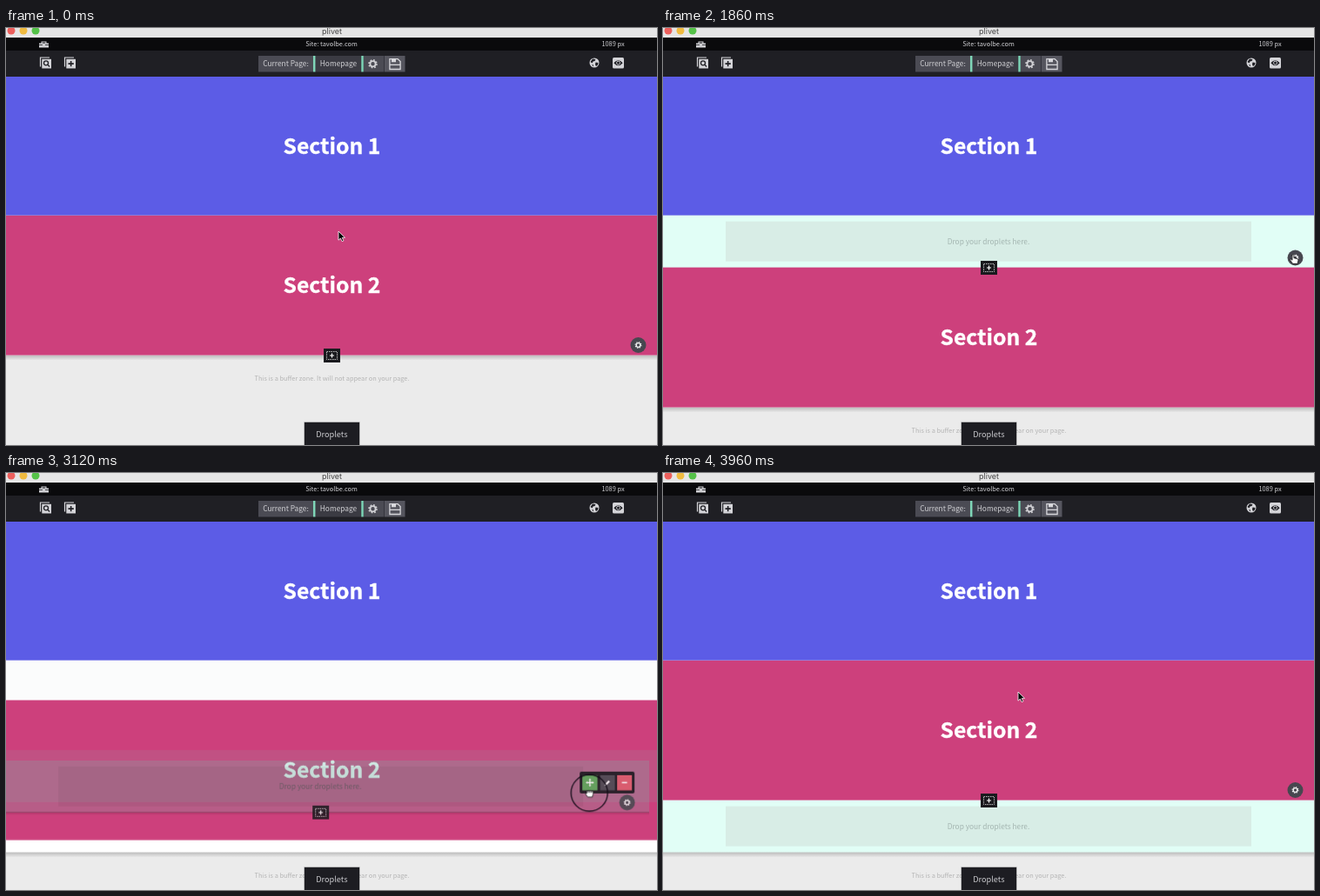
Animation, 748 px wide and 480 px high, one loop 3990 ms. Source, as an HTML page:

```html
<!DOCTYPE html>
<html lang="en">
<head>
<meta charset="utf-8">
<title>Page builder</title>
<style>
html, body { margin: 0; width: 100%; height: 100%; overflow: hidden; background: #fff; }
svg { display: block; width: 748px; height: 480px; }
text { font: 7.4px "Noto Sans CJK JP", "Noto Sans CJK SC", "Noto Sans CJK", "Noto Sans", sans-serif; text-anchor: middle; }
.head { font-size: 24.7px; font-weight: 700; fill: #fff; stroke: #fff; stroke-width: .35px; }
.mid { font-size: 8.35px; }
.big { font-size: 9.2px; }
.win { font: 9px Inter, Roboto, sans-serif; fill: #444; }

/* every moving part shares one clock */
.a { animation: 3990ms linear infinite both; }

/* layout */
.below { animation-name: below; }
.sec2 { animation-name: sec2; }
.home { animation-name: home; }
.gap { animation-name: gap; }
.drop { animation-name: drop; }
@keyframes below {
  0%, 28.6% { transform: translateY(0); animation-timing-function: ease-in-out; }
  35%, 100% { transform: translateY(60px); }
}
@keyframes sec2 {
  0%, 28.6% { transform: translateY(0); animation-timing-function: ease-in-out; }
  35%, 76.3% { transform: translateY(60px); animation-timing-function: ease-in-out; }
  82%, 100% { transform: translateY(0); }
}
@keyframes home { 0%, 67.7% { opacity: 1; } 75%, 100% { opacity: 0; } }
@keyframes gap { 0%, 75% { opacity: 1; } 79%, 100% { opacity: 0; } }
@keyframes drop { 0%, 82.5% { opacity: 0; } 87%, 100% { opacity: 1; } }

/* dragged section */
.drag { animation-name: drag; }
.sheet { animation-name: sheet; }
.trail { animation-name: trail; }
.late { animation-delay: 30ms; }
@keyframes drag {
  0%, 67.7% { transform: translate(0, 0); animation-timing-function: cubic-bezier(.4, 0, .8, .7); }
  74.44% { transform: translate(-6.4px, 55px); }
  80.45% { transform: translate(-16.6px, 150px); animation-timing-function: ease-out; }
  82.5% { transform: translate(-17px, 160px); animation-timing-function: ease-in-out; }
  86%, 100% { transform: translate(0, 161px); }
}
@keyframes sheet { 0%, 67.7% { opacity: 0; } 69%, 82.5% { opacity: 1; } 87%, 100% { opacity: 0; } }
@keyframes trail { 0%, 76% { opacity: 0; } 78%, 81.5% { opacity: .6; } 83%, 100% { opacity: 0; } }

/* hover controls */
.ctl1 { animation-name: ctl1; }
.ctl2 { animation-name: ctl2; }
.ctlNew { animation-name: ctlNew; }
.menu { animation-name: menu; }
.tip1 { animation-name: tip1; }
.tip2 { animation-name: tip2; }
@keyframes ctl1 { 0%, 10% { opacity: 0; } 12.5%, 31% { opacity: 1; } 34%, 100% { opacity: 0; } }
@keyframes ctl2 { 0%, 10% { opacity: 1; } 12.5%, 89% { opacity: 0; } 91.5%, 100% { opacity: 1; } }
@keyframes ctlNew {
  0%, 34% { opacity: 0; } 36.5%, 67.7% { opacity: 1; }
  70%, 82.5% { opacity: .86; } 89% { opacity: 1; } 92%, 100% { opacity: 0; }
}
@keyframes menu {
  0%, 50% { opacity: 0; transform: translateX(12px); animation-timing-function: ease-out; }
  54%, 84% { opacity: 1; transform: none; } 88%, 100% { opacity: 0; transform: none; }
}
@keyframes tip1 { 0%, 15% { opacity: 0; } 18%, 28% { opacity: 1; } 31%, 100% { opacity: 0; } }
@keyframes tip2 { 0%, 60% { opacity: 0; } 63.2%, 65% { opacity: 1; } 67.5%, 100% { opacity: 0; } }

/* pointer */
.mouse { animation-name: mouse; }
.arrow { animation-name: arrow; animation-timing-function: step-end; }
.point { animation-name: point; animation-timing-function: step-end; }
.grab { animation-name: grab; animation-timing-function: step-end; }
.ring { animation-name: ring; }
@keyframes mouse {
  0% { transform: translate(382px, 234px); animation-timing-function: ease-in-out; }
  12.5%, 29.5% { transform: translate(374px, 214px); animation-timing-function: ease-in-out; }
  45%, 50% { transform: translate(723px, 261px); animation-timing-function: ease-in-out; }
  58%, 63% { transform: translate(684px, 244px); }
  67.7% { transform: translate(683px, 251px); animation-timing-function: cubic-bezier(.4, 0, .8, .7); }
  74.44% { transform: translate(677.5px, 306px); }
  80.45% { transform: translate(666px, 405px); animation-timing-function: ease-out; }
  82.5%, 84% { transform: translate(665px, 414px); animation-timing-function: ease-in-out; }
  97%, 100% { transform: translate(408px, 252px); }
}
@keyframes arrow { 0% { opacity: 1; } 10.8% { opacity: 0; } 31.5% { opacity: 1; } 43% { opacity: 0; } 84.5%, 100% { opacity: 1; } }
@keyframes point { 0% { opacity: 0; } 10.8% { opacity: 1; } 31.5% { opacity: 0; } 43% { opacity: 1; } 56%, 100% { opacity: 0; } }
@keyframes grab { 0% { opacity: 0; } 56% { opacity: 1; } 84.5%, 100% { opacity: 0; } }
@keyframes ring {
  0%, 23.5% { opacity: 0; transform: scale(.5); } 25.5%, 27% { opacity: 1; transform: none; }
  29% { opacity: 0; transform: none; }
  48.3% { opacity: 0; transform: scale(.5); } 49.6%, 50.4% { opacity: 1; transform: none; }
  52% { opacity: 0; transform: none; }
  66% { opacity: 0; transform: scale(.5); } 68%, 82.8% { opacity: 1; transform: none; }
  85%, 100% { opacity: 0; transform: none; }
}
</style>
</head>
<body>
<svg viewBox="0 0 748 480">
  <defs>
    <linearGradient id="shade" x2="0" y2="1">
      <stop offset="0" stop-opacity=".2"/><stop offset="1" stop-opacity="0"/>
    </linearGradient>
    <g id="gear" fill="none" stroke="currentColor">
      <circle r="3.1" stroke-width="1.8"/>
      <circle r="4.5" stroke-width="1.6" stroke-dasharray="1.767 1.767"/>
    </g>
    <g id="gearBtn" color="#eee">
      <circle r="9" fill="#47474f"/><use href="#gear" transform="scale(.75)"/>
    </g>
    <g id="addBtn">
      <rect x="-9.5" y="-8" width="19" height="16" fill="#1a1a1e"/>
      <rect x="-6" y="-4.5" width="12" height="9" fill="none" stroke="#ccc" stroke-width=".9" stroke-dasharray="1.5 1"/>
      <path d="M-2.5 0h5M0-2.5v5" stroke="#fff" stroke-width="1.2"/>
    </g>
    <g id="mint">
      <rect width="748" height="61" fill="#e1fef6"/>
      <rect x="72" y="7" width="604" height="46" fill="#d8ede6"/>
      <text class="mid" x="374" y="33" fill="#a3b5b0">Drop your droplets here.</text>
    </g>
    <g id="copy">
      <path d="M-6 4.500V-6H4.500" fill="none" stroke="#d4d4d8" stroke-width="1.200"/>
      <rect x="-4.200" y="-4.200" width="10.700" height="10.700" fill="#d4d4d8"/>
    </g>
  </defs>

  <!-- page -->
  <rect width="748" height="480" fill="#fff"/>
  <rect class="a gap" y="215" width="748" height="62" fill="#e9eff0"/>
  <g class="a home"><use href="#mint" y="215.600"/></g>
  <g class="a drop"><use href="#mint" y="376.600"/></g>
  <g class="a below">
    <rect y="376.600" width="748" height="110" fill="#ebebeb"/>
    <rect y="376.600" width="748" height="6" fill="url(#shade)"/>
    <text x="374.500" y="406" fill="#b4b4b4">This is a buffer zone. It will not appear on your page.</text>
  </g>
  <g class="a sec2">
    <rect y="215.600" width="748" height="161" fill="#cd407c"/>
    <text class="head" x="374.500" y="305.400">Section 2</text>
  </g>
  <rect y="56" width="748" height="159.600" fill="#5c5ce6"/>
  <text class="head" x="374.500" y="145.200">Section 1</text>

  <!-- hover controls of the two fixed sections -->
  <g class="a ctl1">
    <use href="#addBtn" x="374.500" y="216"/><use href="#gearBtn" x="726.500" y="204"/>
  </g>
  <g class="a ctl2">
    <use href="#addBtn" x="374.500" y="377"/><use href="#gearBtn" x="726.500" y="365"/>
  </g>
  <g class="a tip1">
    <path d="M336 183h76v21h-34.500l-3.500 4-3.500-4H336z" fill="#47474f"/>
    <text x="374" y="196.300" fill="#fff">Add Section Here</text>
  </g>

  <!-- dragged section and its controls -->
  <g class="a drag late"><g class="a trail">
    <rect y="216" width="780" height="60" fill="#73bcac" fill-opacity=".23"/>
  </g></g>
  <g class="a drag">
    <g class="a sheet">
      <rect y="216" width="752" height="60" fill="#73bcac" fill-opacity=".23"/>
      <rect y="275" width="752" height="4" fill="url(#shade)"/>
      <rect x="73" y="223" width="603" height="46" fill-opacity=".05"/>
      <text class="mid" x="374" y="249" fill="#4a5452" fill-opacity=".65">Drop your droplets here.</text>
    </g>
    <g class="a tip2">
      <rect x="653" y="208" width="60" height="21" fill="#47474f" fill-opacity=".9"/>
      <text x="683.500" y="221.300" fill="#fff">Drag Section</text>
    </g>
    <g class="a ctlNew">
      <use href="#addBtn" x="374.500" y="276"/>
      <use href="#gearBtn" x="726.500" y="264.500"/>
      <g class="a menu">
        <rect x="672" y="229" width="63" height="25" rx="2" fill="#15151a"/>
        <rect x="675" y="233" width="17.500" height="17.500" fill="#59a857"/>
        <rect x="695.500" y="233" width="17" height="17.500" fill="#47474f"/>
        <rect x="715" y="233" width="17" height="17.500" fill="#e05a6a"/>
        <g stroke="#fff" stroke-width="1.300" fill="#fff">
          <path d="M680.500 241.500h6.500M683.800 238.200v6.500"/>
          <path d="M683.800 236.800l1.500 1.800h-3zM683.800 246.200l1.500-1.800h-3zM679 241.500l1.800-1.500v3zM688.500 241.500l-1.800-1.500v3z" stroke="none"/>
          <path d="M702 243.800l4-4" stroke-width="2.300"/>
          <path d="M700.500 245.300l.6-2.100 1.500 1.500z" stroke="none"/>
          <path d="M720.500 241.500h6" stroke-width="1.600"/>
        </g>
      </g>
    </g>
  </g>

  <!-- window bars -->
  <rect width="748" height="11" fill="#e6e6e6"/>
  <circle cx="6" cy="3" r="4.500" fill="#ec5f5c"/>
  <circle cx="20" cy="3" r="4.500" fill="#f0bb40"/>
  <circle cx="34" cy="3" r="4.500" fill="#55c248"/>
  <text class="win" x="374.500" y="7">plivet</text>
  <rect y="11" width="748" height="15" fill="#0a0a0c"/>
  <rect y="26" width="748" height="30" fill="#1f1f24"/>
  <g fill="#d0d0d4">
    <text x="374" y="21">Site: tavolbe.com</text>
    <text x="697.500" y="21">1089 px</text>
    <path d="M38 17.500h11v5H38zM40.500 17.500v-2h6v2h-1.200v-1h-3.600v1z"/>
    <path d="M38 19.500h4M45 19.500h4" stroke="#0a0a0c" stroke-width=".7"/>
  </g>

  <!-- toolbar -->
  <use href="#copy" x="45.500" y="40"/>
  <g fill="none" stroke="#1f1f24" stroke-width="1.300">
    <circle cx="46" cy="40.300" r="2.500"/><path d="M47.800 42.200l2.300 2.300"/>
  </g>
  <use href="#copy" x="73.500" y="40"/>
  <path d="M71.500 41.100h6.300M74.650 38v6.300" stroke="#1f1f24" stroke-width="1.600"/>
  <rect x="290" y="32" width="63" height="18.500" fill="#4b4b54"/>
  <rect x="355" y="32" width="53" height="18.500" fill="#3b3b43"/>
  <rect x="411" y="32" width="23.500" height="18.500" fill="#4b4b54"/>
  <rect x="435" y="32" width="23.500" height="18.500" fill="#56565f"/>
  <path d="M354.200 32v18.500M409.500 32v18.500" stroke="#7fd6b8" stroke-width="2.500"/>
  <g fill="#d0d0d4">
    <text class="mid" x="321.500" y="44.300">Current Page:</text>
    <text class="mid" x="382" y="44.300">Homepage</text>
  </g>
  <use href="#gear" x="421.500" y="41.300" color="#d0d0d4"/>
  <path d="M440.900 35.600h9.200l3 3v8.900h-12.200z" fill="none" stroke="#d8d8dc" stroke-width="1.300"/>
  <path d="M443 35.500h5v3.800h-5zM441 41.800h12v1.300h-12z" fill="#d8d8dc"/>
  <circle cx="676" cy="40" r="5.500" fill="#d4d4d8"/>
  <path d="M674 35.500l3.500.5-1 2-2 .5-1 2-2-1.500zM677.500 39.500l3 .5-.5 2.500-2 1.500-1-2zM673 42l2 .5v2z" fill="#1f1f24"/>
  <rect x="697" y="34" width="13" height="12.500" rx="1.500" fill="#d4d4d8"/>
  <path d="M698.300 40.200q5.200-6 10.400 0q-5.200 6-10.400 0z" fill="#1f1f24"/>
  <circle cx="703.500" cy="40.200" r="2" fill="none" stroke="#d4d4d8" stroke-width=".9"/>

  <rect x="343" y="454" width="63" height="27" fill="#1d1d22" stroke="#1d1d22" stroke-opacity=".5"/>
  <text class="big" x="374.300" y="471" fill="#c8c8cc">Droplets</text>

  <!-- pointer -->
  <g class="a mouse">
    <circle class="a ring" r="21" fill="none" stroke="#140c18" stroke-width="1.300"/>
    <path class="a arrow" d="M0 0v10.200l2.400-2.200 1.700 3.600 1.800-.8-1.700-3.500h3.300z" fill="#000" stroke="#fff" stroke-width=".8"/>
    <g fill="#fff" stroke="#111" stroke-width=".8" stroke-linejoin="round">
      <path class="a point" d="M0 0q1.200-1 1.900.3v3.400l4 1q1.200.4 1 1.800l-.7 3.800H.6L-2.600 6q-.3-1.300 1-.9L0 6.200z"/>
      <path class="a grab" d="M-3-2q1-1.300 1.900-.1q.9-1.300 1.900-.1q1-1 1.900.2q1.300-.6 1.700.7v2.600L3.300 4.800h-5L-4.500 1.200q-.2-1.200 1.500-.6zM-1.100-2v1.800M.8-2v1.800M2.700-1.800v1.600"/>
    </g>
  </g>
</svg>
</body>
</html>
```
